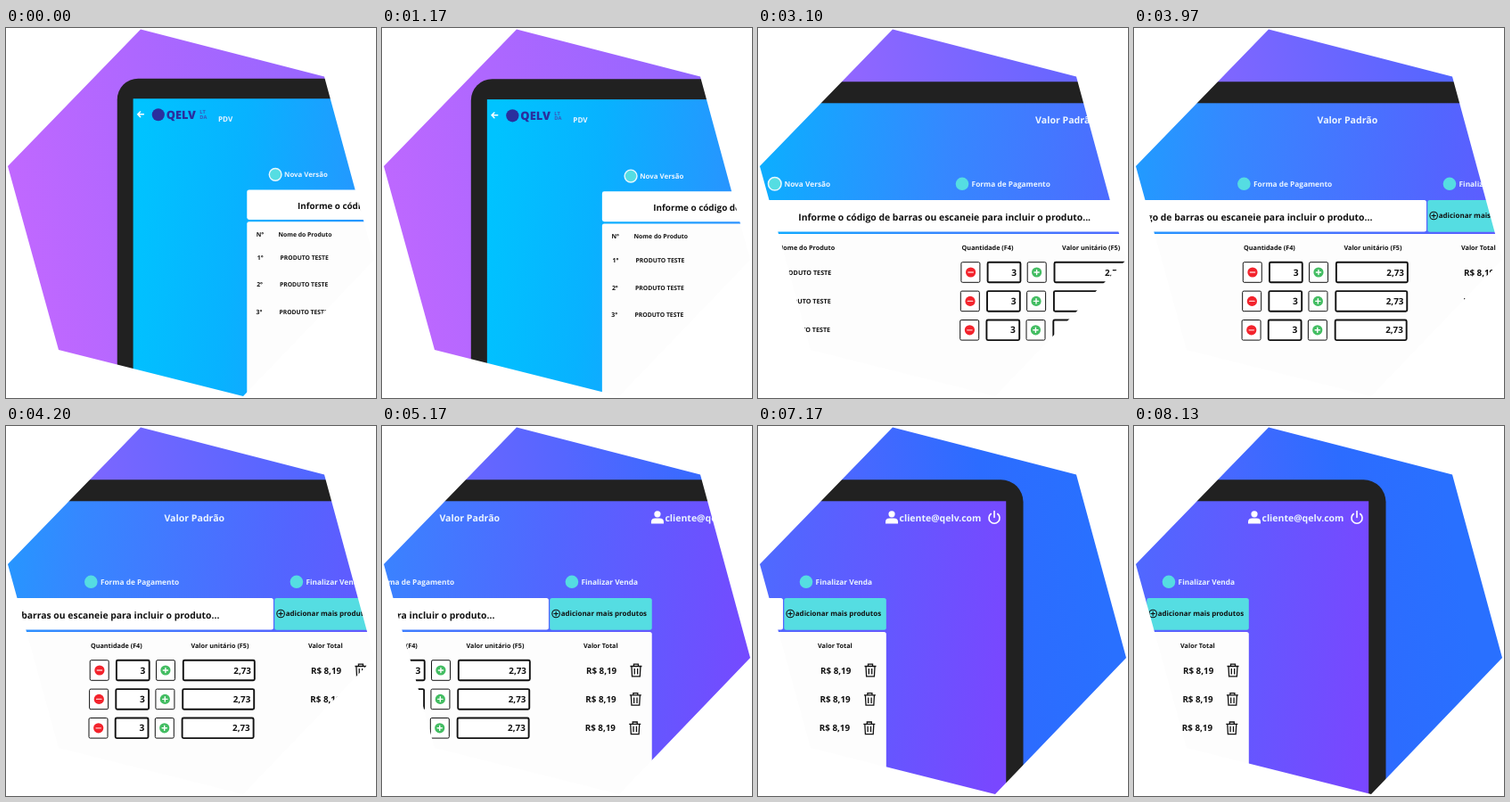
An HTML page that plays this animation: 415 by 415 pixels, repeating every 8160 ms.

```html
<!DOCTYPE html>
<html lang="pt-BR">
<head>
<meta charset="utf-8">
<title>PDV</title>
<style>
html, body { margin: 0; width: 100%; height: 100%; overflow: hidden; background: #fff; }
svg { display: block; width: 100vw; height: 100vh; }
text { font-family: "Open Sans", "Noto Sans", sans-serif; font-weight: 700; text-rendering: geometricPrecision; }
</style>
</head>
<body>
<svg viewBox="0 0 415 415">
  <defs>
    <linearGradient id="wall" gradientUnits="userSpaceOnUse" x1="-170" y1="260" x2="900" y2="60">
      <stop offset="0" stop-color="#c268ff"/>
      <stop offset=".35" stop-color="#9a66ff"/>
      <stop offset=".72" stop-color="#5566ff"/>
      <stop offset=".9" stop-color="#2c6cff"/>
      <stop offset="1" stop-color="#2970ff"/>
    </linearGradient>
    <linearGradient id="screen" gradientUnits="userSpaceOnUse" x1="-18" y1="200" x2="816" y2="290">
      <stop offset="0" stop-color="#00c3ff"/>
      <stop offset=".15" stop-color="#08b2ff"/>
      <stop offset=".42" stop-color="#3588ff"/>
      <stop offset=".7" stop-color="#5365ff"/>
      <stop offset="1" stop-color="#7947ff"/>
    </linearGradient>
    <g id="trash" fill="none" stroke="#111" stroke-width="1.3">
      <path d="M-6.5-4.5H6.5M-2.5-4.5V-6.8H2.5V-4.5M-5-4.5-4.4 6.8H4.4L5-4.5M-1.7-2V4.5M1.7-2V4.5"/>
    </g>
  </defs>
  <g id="scene"></g>
  <!-- white cover with the six-sided window -->
  <path fill="#fff" fill-rule="evenodd" d="M-9-9H424V424H-9ZM151 1.5 357 54.5 413 260 266 413 59 361 2 155Z"/>
</svg>
<script>
const LOOP = 8160, INK = '#111', SOFT = '#eaf4ff', TEAL = '#55dde2';
const scene = document.getElementById('scene');

const rect = (x, y, w, h, fill, extra = '') =>
  `<rect x="${x}" y="${y}" width="${w}" height="${h}" fill="${fill}" ${extra}/>`;
const dot = (x, y, r, fill, extra = '') =>
  `<circle cx="${x}" cy="${y}" r="${r}" fill="${fill}" ${extra}/>`;
const line = (d, color, w) =>
  `<path d="${d}" fill="none" stroke="${color}" stroke-width="${w}" stroke-linecap="round"/>`;
// y is the middle of the capitals
const text = (x, y, size, str, fill = INK, extra = '') =>
  `<text x="${x}" y="${y + size * .36}" font-size="${size}" fill="${fill}" ${extra}>${str}</text>`;
const box = (x, w, weight) =>
  rect(x, -11.3, w, 22.6, '#fff', `rx="1.5" stroke="${INK}" stroke-width="${weight}"`);

const step = (x, label, extra) => dot(x, 174.8, 7.3, TEAL, extra) + text(x + 10.6, 174.8, 8.3, label, SOFT);

const row = i => `<g transform="translate(${-.6 * i} ${274 + 32.4 * i})">` +
  text(129.5, 0, 7.3, i + 1 + '°') +
  text(157, 0, 7.2, 'PRODUTO TESTE') +
  box(360.3, 21, 1) + dot(371, 0, 5.6, '#f3232c') + line('M368.3 0h5.4', '#ffc9c9', 1.3) +
  box(390, 36.8, 1.9) + text(422.5, 0, 10.2, '3', INK, 'text-anchor="end"') +
  box(434.6, 21, 1) + dot(445, 0, 5.6, '#43bd62') + line('M442.4 0h5.2M445-2.6v5.2', '#fff', 1.4) +
  box(464.9, 80, 1.9) + text(541, 0, 9.8, '2,73', INK, 'text-anchor="end"') +
  text(608, 0, 9.8, 'R$ 8,19') +
  '<use href="#trash" x="664"/></g>';

scene.innerHTML =
  rect(-250, -20, 1400, 520, 'url(#wall)') +
  rect(-37.5, 60.3, 873, 600, '#212121', 'rx="25"') +
  rect(-18.5, 84.3, 834.7, 500, 'url(#screen)') +
  // header
  line('M-6 103h-7m3-3-3 3 3 3', '#fff', 1.6) +
  dot(11.5, 103.5, 7.5, '#2a2f9e') +
  text(21, 103.5, 13.6, 'QELV', '#2a2f9e', 'style="font-weight:800"') +
  text(61, 100.5, 6, 'LT', '#3b55b8') + text(61, 106.5, 6, 'DA', '#3b55b8') +
  text(83, 108.8, 8.6, 'PDV', SOFT) +
  text(443.5, 103, 10.6, 'Valor Padrão', SOFT) +
  dot(688, 98.8, 3.6, '#fff') +
  '<path d="M681 109.5v-2q0-4 4.5-4h5q4.5 0 4.5 4v2z" fill="#fff"/>' +
  text(696.5, 103, 10.5, 'cliente@qelv.com', SOFT) +
  line('M799.3 98.5a6 6 0 1 0 7.4 0M803 95.5v7', '#fff', 1.6) +
  // steps
  step(151.2, 'Nova Versão', 'stroke="#e6f7ff" stroke-width="1.5"') +
  step(361.4, 'Forma de Pagamento') +
  step(592, 'Finalizar Venda') +
  // search bar and button
  rect(117.3, 193, 448.7, 35.6, '#fff', 'rx="2.5"') +
  text(177.7, 212, 10.4, 'Informe o código de barras ou escaneie para incluir o produto...') +
  rect(567.3, 193, 114.5, 35.8, TEAL, 'rx="2.5"') +
  dot(574.2, 210.5, 4.3, 'none', `stroke="${INK}" stroke-width="1.1"`) +
  line('M572 210.5h4.4M574.2 208.3v4.4', INK, 1.1) +
  text(579.8, 210.5, 7.95, 'adicionar mais produtos') +
  // table
  rect(117.3, 231, 564.5, 300, '#fdfdfd', 'rx="2.5"') +
  [[128.5, 'N°'], [154.8, 'Nome do Produto'], [361, 'Quantidade (F4)'],
   [473.5, 'Valor unitário (F5)'], [605, 'Valor Total']]
    .map(([x, label]) => text(x, 246, 7.25, label)).join('') +
  [0, 1, 2].map(row).join('');

const ramp = (t, from, to) => Math.min(1, Math.max(0, (t - from) / (to - from)));
const inOut = u => (1 - Math.cos(Math.PI * u)) / 2;
// brisk start, long slow-down to rest
const glide = u => u * (1.35 + u * (.3 - .65 * u));

function frame(now) {
  const t = now % LOOP;
  const zoom = inOut(ramp(t, 1000, 1640));
  const x = 160 - 148 * zoom
    - 142.5 * inOut(ramp(t, 1870, 2720))
    - 422.5 * glide(ramp(t, 3085, 7900));
  scene.setAttribute('transform', `translate(${x} 0) scale(${.94 + .06 * zoom})`);
  requestAnimationFrame(frame);
}
frame(performance.now());
</script>
</body>
</html>
```
